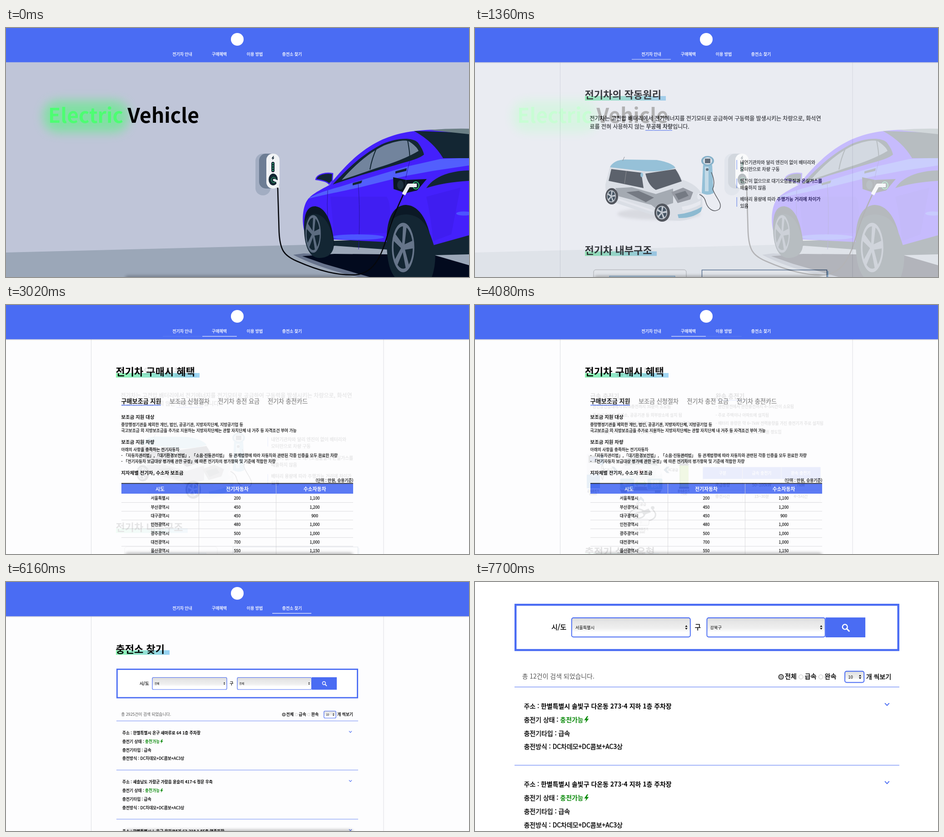
These frames come from a looping animation (1019 by 549 pixels, 8000 ms). An HTML page:

```html
<!DOCTYPE html>
<html lang="ko">
<head>
<meta charset="utf-8">
<title>전기차 안내</title>
<style>
html, body { margin: 0; width: 100%; height: 100%; overflow: hidden; background: #fff; }
svg { display: block; width: 1019px; height: 549px; }
text { font-family: "Noto Sans CJK KR", "Noto Sans CJK JP", "Noto Sans CJK", sans-serif; }
tspan { stroke: none; }
</style>
</head>
<body>
<svg id="stage" viewBox="0 0 1019 549"></svg>
<script>
const BLUE = '#4a6cf3', DARK = '#132633', BODY = '#4420fc';
// A hairline outline gives the regular face a medium weight.
const bold = 'font-weight="700"', medium = 'stroke="currentColor" stroke-width=".25"';
const mid = 'text-anchor="middle"', white = 'fill="#fff" color="#fff"';

// Text is placed by its left edge (or anchor) and the vertical centre of its glyphs.
const text = (x, cy, size, s, more = '') =>
  `<text x="${x}" y="${(cy + size * .38).toFixed(1)}" font-size="${size}" ${more}>${s}</text>`;
const rect = (x, y, w, h, fill, more = '') =>
  `<rect x="${x}" y="${y}" width="${w}" height="${h}" fill="${fill}" ${more}/>`;
const oval = (x, y, rx, ry, fill, more = '') =>
  `<ellipse cx="${x}" cy="${y}" rx="${rx}" ry="${ry}" fill="${fill}" ${more}/>`;
const path = (d, fill, more = '') => `<path d="${d}" fill="${fill}" ${more}/>`;
const line = (d, color, width = 1, more = '') =>
  `<path d="${d}" fill="none" stroke="${color}" stroke-width="${width}" ${more}/>`;
const lines = (x, rows, size, more) => rows.map(([cy, s]) => text(x, cy, size, s, more)).join('');

const wheel = (x, y, rx, ry, color) => `<g transform="translate(${x} ${y}) scale(${rx / 50} ${ry / 50})">
  <circle r="46" fill="${DARK}" stroke="${color}" stroke-width="7"/>` +
  [0, 72, 144, 216, 288].map(a => `<path d="M-5 0L-8 -45H8L5 0z" fill="${color}" transform="rotate(${a + 10})"/>`).join('') +
  `<circle r="9" fill="${color}"/></g>`;

const bolt = (x, y, k, fill) =>
  path('M1-6L-4 1H-.5L-2 6L4-1.5H.5L3-6z', fill, `transform="translate(${x} ${y}) scale(${k})"`);

const tabs = [['전기차 안내', 388, 345, 86], ['구매혜택', 469.5, 432, 76], ['이용 방법', 547.5, 508, 79], ['충전소 찾기', 629.5, 586, 86]];
const header = active => rect(0, 0, 1019, 75.5, BLUE) +
  oval(509, 25, 14, 14, '#fff') +
  tabs.map(([s, x, ux, w], i) => text(x, 58, 8.95, s, `${mid} ${white} ${medium}`) +
    (i === active ? rect(ux, 68.5, w, 1.2, '#fff') : '')).join('');

const bottomShade = rect(262, 546, 502, 16, '#000', 'rx="6" opacity=".25" filter="url(#soft)"');

const page = (active, content) => rect(0, 0, 1019, 549, '#fdfdfe') +
  line('M187.5 76V549M831 76V549', '#dcdde2') + content +
  rect(0, 75, 1019, 3.5, 'url(#drop)') + header(active) + bottomShade;

const title = (cy, s, end) => rect(242, cy + 3, end - 242, 10, 'url(#mark)') + text(241.5, cy, 22.05, s, bold);

function hero() {
  const car =
    path('M632 500L655 497L720 500L800 549H775Q690 530 632 500', '#67738c') +
    path('M652 503L722 498L940 500L1019 523V549H800L700 520Z', '#020a1e') +
    path('M700 470L840 465L935 470L1019 450V499L940 501L845 489L722 480Z', DARK) +
    // body shell
    path('M656 446C651 425 653 400 660 385C668 368 690 358 712 346C740 311 775 272 822 249C855 233 890 226 940 224L1019 223V457L933 481L840 472L716 466Z', BODY) +
    path('M714 372L838 372Q852 395 838 452L722 456Z', '#401ef2') +
    path('M925 372L1000 352L980 455L940 470Q936 420 925 372', '#3f1df0') +
    path('M664 377C690 360 725 354 760 342L880 306L955 289L1019 286V303L940 315L880 326L800 346C750 359 695 368 664 377Z', '#525ffd') +
    // windows
    path('M898 227L1019 231V287L962 287Q940 250 898 227Z', DARK) +
    path('M930 225Q975 221 1019 222V234Q970 229 930 225Z', '#6b7f85') +
    path('M719 345C748 314 780 281 826 257C857 242 893 240 906 252Q917 266 920 279Q910 288 875 297L780 325Z', DARK) +
    path('M739 335C765 305 798 275 832 259C858 249 878 246 887 250Q904 261 908 271Q875 291 815 309Z', '#72849d') +
    line('M816 264Q805 288 801 312M884 248Q888 268 889 287', DARK, 2) +
    path('M925 353Q940 330 975 320Q998 314 1019 314V337Q965 340 925 353Z', DARK) +
    path('M682 334C684 322 705 318 719 321L718 337L711 344Q706 337 682 334Z', DARK, `stroke="${BODY}" stroke-width="2.5"`) +
    // panel seams, handles and highlights
    line('M708 358Q704 420 716 466M775 342Q780 400 776 488M889 292Q884 310 880 330', '#24149a', .9) +
    path('M763 342L784 336L782 342L763 347ZM857 316L882 309L881 315L857 321Z', DARK) +
    oval(774, 461, 58, 6, '#4c55ff') + oval(1008, 409, 17, 4.5, '#4c55ff') +
    // wheel arches and tyres
    path('M656 440C656 405 665 393 681 393C708 397 718 435 723 480L700 490Z', '#0b1926') +
    path('M656 440C657 418 668 409 682 410C705 414 715 440 721 472C724 492 712 507 690 507C665 507 656 475 656 440Z', DARK) +
    wheel(676, 454, 17, 42, '#5c6c80') +
    path('M838 476C836 425 850 391 880 390C912 391 932 430 938 485Z', '#0b1926') +
    path('M838 472C838 430 850 411 882 411C917 413 930 440 942 480C948 505 943 535 936 552H858C842 535 838 505 838 472Z', DARK) +
    wheel(874, 484, 25, 55, '#66758a') +
    // charging port
    path('M852 329L881 335L926 333L905 358L880 364L853 355Z', '#0b1722') + oval(868, 346, 7, 10, '#1d303e') +
    line('M880 335V364', '#31404d');
  const charger = rect(549, 277, 33, 92, '#a2adc2', 'rx="16"') + rect(557, 277, 44, 77, '#6d7d94', 'rx="15"') +
    rect(573, 277, 29, 77, '#f1f3f5', 'rx="14"') + bolt(587.5, 287, .8, DARK) + rect(584, 295, 7, 23, DARK, 'rx="3.5"') +
    [299, 304, 309, 314].map(y => oval(587.5, y, 1.3, 1.3, '#3be48b')).join('') +
    oval(588, 334, 10, 13, DARK) + oval(589, 335, 5, 6, 'none', 'stroke="#37d77f"') +
    line('M590 335L597 338L599 352', '#e9edf0', 5, 'stroke-linecap="round"');
  return rect(0, 0, 1019, 549, '#bfc5d8') + path('M0 495L700 477L1019 477V549H0Z', '#9ba7b8') +
    rect(82, 160, 188, 70, '#5cf083', 'rx="32" opacity=".62" filter="url(#glow)"') +
    text(93, 192.5, 44.4, 'Electric', `${bold} fill="#4dfd72"`) + text(267.5, 192.5, 44.4, 'Vehicle', bold) +
    charger + car +
    line('M598 352L601 450C603 490 612 502 640 514C690 536 730 546 770 544C815 540 830 490 840 455C850 420 862 395 874 368', '#05070c', 2.6) +
    oval(902, 347, 7, 8, DARK, 'stroke="#35e383" stroke-width="1.6"') +
    line('M875 367L886 347L904 347', '#eceff2', 8, 'stroke-linejoin="round"') +
    header(-1) + bottomShade;
}

function guide() {
  const tyre = (x, y, rx, ry) => oval(x, y, rx, ry, '#25282b') + wheel(x - 1, y, rx * .72, ry * .75, '#c3c8cc');
  const car = oval(405, 410, 92, 13, '#999', 'opacity=".25" filter="url(#soft)"') +
    path('M287 345L298 303Q312 290 350 291L425 297Q441 302 455 334Q490 345 500 368L501 398Q490 422 450 425L425 424L305 384Q286 370 287 345Z', '#e6e9eb') +
    path('M297 307Q305 291 330 290L400 291Q434 297 441 308Q420 317 375 316Z', '#85c0d8') +
    path('M300 311L366 319L371 353L294 337ZM375 321L441 311Q449 322 455 338L398 357Q381 347 375 321Z', '#33393f') +
    line('M333 315L329 343M325 293L329 284', '#777') +
    path('M309 353L345 351L398 366L436 354L436 386L398 398L388 390L316 371Z', '#9a9fa3') +
    path('M432 362L458 352L480 362L474 378L446 386Z', '#85898d') +
    path('M333 362L360 359L394 374L376 384ZM440 366L463 359L470 370L448 379Z', '#565b60') +
    line('M316 378L392 404', '#f4f5f6', 4) +
    path('M446 411Q476 408 500 394L497 405Q478 420 448 419Z', '#78b6cf') + oval(493, 371, 4, 7, '#f6f8f9') +
    path('M455 394Q478 391 497 380L496 389Q476 400 457 402Z', '#f8f9fa') +
    tyre(301, 371, 14, 18) + tyre(412, 407, 17, 20) + oval(367, 324, 3, 5, '#85c0d8');
  const post = path('M502 302H522L525 364Q512 371 499 364Z', '#82bfd7') + rect(506, 306, 8, 54, '#c7e3ee') +
    oval(512, 293, 14, 11, '#6ea9c4') + oval(512, 293, 10, 8, '#e4edf1') + rect(506, 288, 12, 10, '#3b4a55') + oval(511, 312, 3, 3, '#3b4a55') +
    line('M520 318Q530 340 523 355C530 375 546 387 538 399C525 409 512 398 508 384Q505 371 494 367', '#333', 1.5);
  return page(0, title(147, '전기차의 작동원리', 420) +
    text(252.5, 199.7, 12.03, '전기차는 고전압 배터리에서 전기에너지를 전기모터로 공급하여 구동력을 발생시키는 차량으로, 화석연', medium) +
    text(252.5, 217, 12.03, `료를 전혀 사용하지 않는 <tspan ${bold}>무공해 차량</tspan>입니다.`, medium) +
    rect(375, 225, 59, 1.3, BLUE) + car + post +
    [291, 332, 373].map(y => rect(575.5, y, 1.5, 21, '#6f8cf0')).join('') +
    lines(583.5, [[296, '내연기관차와 달리 엔진이 없이 배터리와'], [311, '모터만으로 차량 구동'],
      [337, '엔진이 없으므로 대기오염물질과 온실가스를'], [352, '배출하지 않음'],
      [377.5, '배터리 용량에 따라 주행가능 거리에 차이가'], [392.5, '있음']], 9.87, medium) +
    title(489.5, '전기차 내부구조', 400) +
    rect(261, 533, 204, 40, '#fff', 'rx="5" stroke="#aaa"') + rect(296, 547, 144, 20, '#dcecf8', 'stroke="#4e9ad6"') +
    rect(502, 536, 276, 30, '#a9cdea') + rect(499.5, 533.5, 275, 30, '#fff', 'stroke="#3c5a80" stroke-width="1.5"'));
}

function benefits() {
  const cities = [['서울', '200', '1,100'], ['부산', '450', '1,200'], ['대구', '450', '900'], ['인천', '480', '1,000'],
    ['광주', '500', '1,000'], ['대전', '700', '1,000'], ['울산', '550', '1,150']];
  const cols = [339, 509, 679.5];
  const rows = cities.map(([city, ...sums], i) => {
    const y = 426 + i * 19.3;
    return [city + (city === '서울' ? '특별시' : '광역시'), ...sums].map((s, c) => text(cols[c], y, 8.8, s, `${mid} ${medium}`)).join('') +
      line(`M254 ${y + 9.5}H764`, '#d0d0d4', .8);
  }).join('');
  return page(1, title(147, '전기차 구매시 혜택', 426) +
    text(253.5, 211.5, 13.1, '구매보조금 지원', bold) + rect(254, 220, 87, 1.6, BLUE) +
    [[360, '보조금 신청절차'], [466.5, '전기차 충전 요금'], [576, '전기차 충전카드']]
      .map(([x, s]) => text(x, 211.5, 13.1, s, `fill="#777" color="#777" ${medium}`)).join('') +
    lines(253.5, [[247, '보조금 지원 대상'], [302, '보조금 지원 차량'], [370, '지자체별 전기차, 수소차 보조금']], 10.45, bold) +
    lines(253.5, [[264, '중앙행정기관을 제외한 개인, 법인, 공공기관, 지방자치단체, 지방공기업 등'],
      [276.7, '국고보조금 외 지방보조금을 추가로 지원하는 지방자치단체는 관할 자치단체 내 거주 등 자격조건 부여 가능'],
      [318.7, '아래의 사항을 충족하는 전기자동차'], [331.7, '- 「자동차관리법」,'],
      [344.8, '- 「전기자동차 보급대상 평가에 관한 규정」에 따른 전기차의 평가항목 및 기준에 적합한 차량']], 8.76, medium) +
    [[328.5, '「대기환경보전법」,'], [409, '「소음·진동관리법」'], [490.5, '등 관계법령에 따라 자동차와 관련된 각종 인증을 모두 완료한 차량']]
      .map(([x, s]) => text(x, 331.7, 8.76, s, medium)).join('') +
    text(764.5, 386.5, 8.8, '(단위 : 만원, 승용기준)', `text-anchor="end" ${medium}`) +
    rect(254, 394, 510, 22, BLUE) + rect(254, 392.5, 510, 1.7, '#111') + rows +
    line('M424.5 394V549M594.5 394V549', '#d0d0d4', .8) +
    ['시도', '전기자동차', '수소자동차'].map((s, c) => text(cols[c], 405.5, 10.8, s, `${mid} ${bold} ${white}`)).join(''));
}

function usage() {
  const navy = '#1d4f6b', teal = '#2b8ba3';
  const chevron = (x, y, turn) => path('M-6-7H0L7 0L0 7H-6L0 0Z', navy, `transform="translate(${x} ${y}) rotate(${turn})"`);
  const label = (x, y, size, s, more = '') => text(x, y, size, s, `${mid} ${medium} ${more}`);
  const fast = rect(246, 328, 29, 76, '#e6eaee') + rect(246, 374, 29, 30, '#3f82c5') + rect(250, 332, 21, 16, '#20262c') +
    rect(253, 335, 14, 9, '#3c5aa8') + oval(261, 375, 5, 5, '#7db4dd') + rect(275, 331, 8, 22, '#3d81c4', 'rx="2"') +
    line('M279 353Q275 380 281 385Q286 370 280 350', '#222', 1.2);
  const car = path('M318 375L331 340Q336 330 350 330H381Q396 331 401 341L412 375V407Q405 414 388 413H341Q322 414 318 405Z', '#d8e6e5') +
    path('M329 354L337 336Q365 330 394 336L402 354Q365 349 329 354Z', '#40545b') +
    path('M318 404Q365 397 412 404L408 414H396V409H334V414H322Z', '#3d4a4f') +
    oval(326, 369, 6, 7, '#f8fbfb') + oval(404, 369, 6, 7, '#f8fbfb') +
    rect(334, 373, 62, 9, '#bccfce', 'rx="4"') + oval(364, 367, 5, 5, '#d2232f') +
    rect(319, 382, 32, 24, teal, 'rx="3" stroke="#fff"') + rect(379, 382, 34, 25, teal, 'rx="3" stroke="#fff"') +
    path('M351 394L358 387V391H372V387L379 394L372 401V397H358V401Z', '#43b52b') +
    label(335, 394, 7, '배터리', white) + label(396, 389.5, 6.6, '탑재형', white) + label(396, 398.5, 6.6, '충전기', white);
  const slow = rect(450, 328, 20, 76, '#8ed313') + rect(450, 328, 20, 26, '#2c3334') + rect(453, 332, 14, 8, '#59675f') +
    rect(450, 354, 3, 50, '#74b20b') + rect(449, 401, 22, 4, '#26301f');
  const cable = line('M344 476C332 462 344 447 362 450C382 454 374 472 356 470C342 466 350 456 374 457M380 476Q400 472 397 459L390 449', '#20262a', 3) +
    path('M366 455L382 449L387 457L371 463Z', '#20262a') + oval(391, 447, 4, 3.5, '#20262a') +
    rect(346, 472, 37, 14, '#eceef0', 'rx="4" stroke="#555" stroke-width=".8"') + oval(365, 479, 3, 3, '#c5c9cd');
  const cols = [545, 631, 717];
  const grid = [[396.5, ['공급용량', '50~100kW', '7kW']], [422, ['충전시간', '15~30분', '4~5시간']]];
  return page(2, title(147, '전기차 충전속도', 400) +
    [[253.5, '급속 충전기'], [529.5, '완속 충전기']].map(([x, s]) => text(x, 201, 13.1, s, bold) + rect(x, 209.5, 66, 1.4, BLUE)).join('') +
    lines(253.5, [[223.5, '- 완전방전상태에서 80%충전까지 30분이 소요됨'], [242.3, '- 주로 고속도로 휴게소, 공공기관 등 외부장소에 설치 됨'],
      [261, '- 충전기는 고용량의 전력을 공급해야 하므로 50kW급이 주로 설치됨'], [280, '- 사용요금은 100km 당 2,700원 정도임']], 8.76, medium) +
    lines(529.5, [[223.5, '- 완전방전에서 완전충전까지 4~5시간이 소요됨'], [242.3, '- 주로 주택이나 아파트에 설치됨'],
      [261, '- 배터리 용량은 약 6~7kW 전력용량을 가진 충전기가 주로 설치됨'], [280, '- 전기요금은 100km당, 1,100원 정도임']], 8.76, medium) +
    fast + car + slow + cable + chevron(306, 363.5, 0) + chevron(422, 363.5, 180) + chevron(365, 429, -90) +
    label(291.5, 363.5, 7.2, 'DC공급') + label(436, 363.5, 7.2, 'AC공급') + label(365.5, 439.5, 7.2, 'AC공급') +
    label(260, 410, 5.7, '급속충전기') + label(260, 417, 5.4, '(50kW)') + label(459, 410, 5.7, '완속충전기') + label(460, 417, 5.4, '(7kW)') +
    label(365, 493.5, 5.8, '이동형충전기') + label(365, 500.5, 5.4, '(3.2kW)') +
    rect(502, 358, 258, 76, '#fff', 'stroke="#ccc"') + rect(501.5, 357.5, 259, 26, BLUE) +
    line('M502 408.5H760', '#ccc') + line('M588.5 358V434M674 358V434', '#ccc') +
    ['구분', '급속 충전기', '완속 충전기'].map((s, c) => text(cols[c], 371, 8.8, s, `${mid} ${bold} ${white}`)).join('') +
    grid.map(([y, row]) => row.map((s, c) => text(cols[c], y, 8.8, s, `${mid} ${medium}`)).join('')).join('') +
    title(544, '충전기 설치 유형', 405));
}

// Search form and result list, shown at page size and again enlarged.
function search(city, district, count, addresses, rule) {
  const box = (x, y, w, h, s, size, tx) => rect(x, y, w, h, 'url(#field)', `rx="2.5" stroke="${BLUE}" stroke-width="1.2"`) +
    text(x + tx, y + h / 2, size, s) +
    path('M-1.7-.7L0-3L1.7-.7ZM-1.7.7L0 3L1.7.7Z', '#111', `transform="translate(${x + w - 5.5} ${y + h / 2})"`);
  const radio = (x, s, on) => oval(x, 292.3, 3, 3, on ? '#fff' : '#fcfcfc', on ? 'stroke="#666" stroke-width="2"' : 'stroke="#bbb" stroke-width=".6"') +
    (on ? oval(x, 292.3, 1, 1, '#555') : '') + text(x + 5.3, 291.5, 8.8, s, medium);
  const entry = (address, i) => `<g transform="translate(0 ${i * 108.3})">` +
    text(256, 332.7, 8.76, `주소 : <tspan ${bold}>${address}</tspan>`, medium) +
    text(256, 351.5, 8.76, `충전기 상태 : <tspan ${bold} fill="#0a8a0a">충전가능</tspan>`, medium) + bolt(342.5, 351.5, .8, '#0a8a0a') +
    text(256, 370.3, 8.76, '충전기타입 : 급속', medium) + text(256, 389, 8.76, '충전방식 : DC차데모+DC콤보+AC3상', medium) +
    line('M755 328.6L758 331.8L761 328.6', BLUE, 1.2) + line('M243 414.6H775', BLUE, rule) + '</g>';
  return rect(244.4, 192.4, 529.2, 62.7, '#fff', `stroke="${BLUE}" stroke-width="2.8"`) +
    text(294, 223.5, 9.3, '시/도', medium) + box(322, 210.5, 164, 26.5, city, 5.8, 5) +
    text(492.3, 223.5, 9, '구', medium) + box(509, 210.5, 163.5, 26.5, district, 5.8, 4.5) +
    rect(673, 210, 55, 27.5, BLUE) + oval(699.8, 223, 3.4, 3.4, 'none', 'stroke="#fff" stroke-width="1.5"') +
    line('M702.3 225.6L705.5 228.8', '#fff', 1.9, 'stroke-linecap="round"') +
    text(253.5, 291.5, 8.75, `총 ${count}건이 검색 되었습니다.`, 'fill="#555"') +
    radio(611.5, '전체', true) + radio(639, '급속') + radio(666.5, '완속') +
    box(699.7, 284.5, 26.5, 15.5, '10', 6, 4.5) + text(729, 291.8, 8.8, '개 씩보기', medium) +
    line('M243 306.3H775', BLUE, rule) + addresses.map(entry).join('');
}

const station = '한별특별시 솔빛구 다온동 273-4 지하 1층 주차장';
const scenes = [
  hero(), guide(), benefits(), usage(),
  page(3, title(147.5, '충전소 찾기', 360) + search('전체', '전체', 2925,
    ['한별특별시 온구 새마루로 64 1층 주차장', '새솔남도 가람군 가람읍 윤슬리 417-6 정문 우측', '한별특별시 노을구 은하로5가 62-318 1 5F층 옆주차장'], .8)),
  rect(0, 0, 1019, 549, '#fff') + `<g transform="matrix(1.592 0 0 1.592 -299.9 -256.1)">${search('서울특별시', '강북구', 12, [station, station], .65)}</g>`
];

const gradient = (id, dir, stops) => `<linearGradient id="${id}" x1="0" y1="0" ${dir}>` +
  stops.map(([at, color, o = 1]) => `<stop offset="${at}" stop-color="${color}" stop-opacity="${o}"/>`).join('') + '</linearGradient>';
const blur = (id, d) => `<filter id="${id}" x="-50%" y="-100%" width="200%" height="300%"><feGaussianBlur stdDeviation="${d}"/></filter>`;

const stage = document.getElementById('stage');
stage.innerHTML = '<defs>' +
  gradient('mark', 'x2="1" y2="0"', [[0, '#8bf5b0'], [1, '#98d1f4']]) +
  gradient('drop', 'x2="0" y2="1"', [[0, '#667', .35], [1, '#667', 0]]) +
  gradient('field', 'x2="0" y2="1"', [[0, '#d9d9d9'], [.2, '#e6e6e6'], [.55, '#efefef'], [.75, '#fff'], [1, '#fff']]) +
  blur('soft', 3) + blur('glow', 11) + '</defs>' + scenes.map(s => `<g>${s}</g>`).join('');
const layers = [...stage.querySelectorAll(':scope > g')];

// Each page holds for a second, then the next one fades in over ten 60 ms steps.
function draw(now) {
  const t = now % 8000;
  layers.forEach((layer, i) => {
    const step = Math.floor((t - 1000 - (i - 1) * 1540) / 60) + 1;
    const alpha = i ? Math.max(0, Math.min(1, step / 10)) : 1;
    layer.style.opacity = alpha;
    layer.style.display = alpha ? '' : 'none';
  });
}
const start = performance.now();
function tick() {
  draw(performance.now() - start);
  requestAnimationFrame(tick);
}
tick();
</script>
</body>
</html>
```
